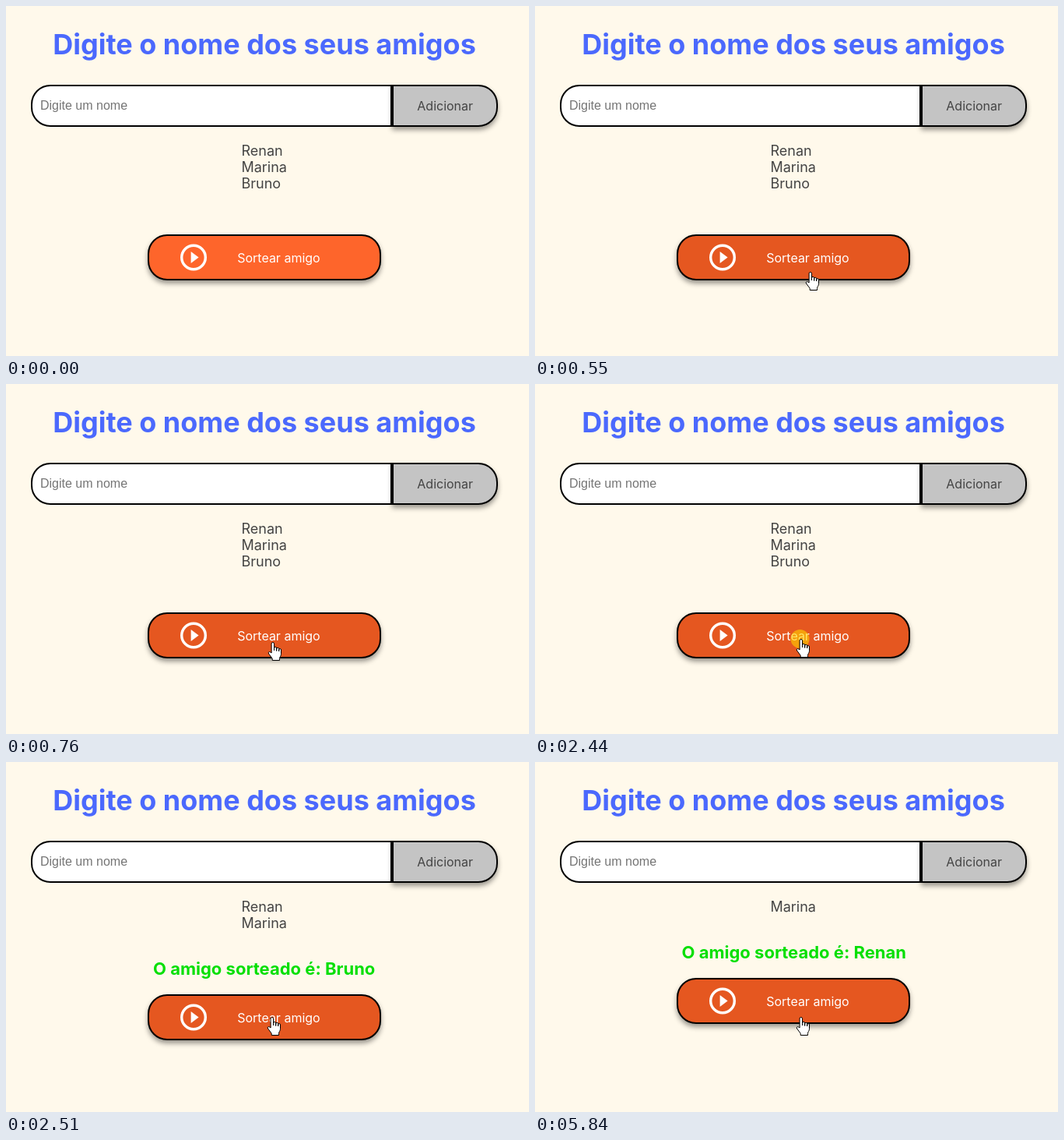
An HTML page for the animation above (8 s loop, 672 by 449 pixels).

```html
<!DOCTYPE html>
<html lang="pt-BR">
<head>
<meta charset="utf-8">
<title>Sorteio de amigos</title>
<style>
  html, body { margin: 0; width: 100%; height: 100%; overflow: hidden; background: #fff9eb; }
  svg { display: block; width: 672px; height: 449px; }
  text { font-family: Inter, sans-serif; font-size: 16px; fill: #444; }
  .title { font-size: 36px; font-weight: 700; fill: #4b69fd; text-anchor: middle; }
  .placeholder { font-family: "Liberation Sans", Arial, sans-serif; fill: #757575; }
  .friend { font-size: 18px; }
  .result { font-size: 22px; font-weight: 700; fill: #05df05; }
  .box { stroke: #000; stroke-width: 2; }
  .shadow { filter: drop-shadow(0 4px 3px rgba(0, 0, 0, .4)); }
  .cursor { fill: #fff; stroke: #000; stroke-linejoin: round; }
</style>
</head>
<body>
<svg viewBox="0 0 672 449">
  <text class="title" x="332" y="62">Digite o nome dos seus amigos</text>

  <path class="box" fill="#fff" d="M495 102H57a24 24 0 0 0-24 24v4a24 24 0 0 0 24 24H495z"/>
  <text class="placeholder" x="44" y="133">Digite um nome</text>
  <path class="box shadow" fill="#c4c4c4" d="M497 102H607a24 24 0 0 1 24 24v4a24 24 0 0 1-24 24H497z"/>
  <text x="528.3" y="134">Adicionar</text>

  <g id="friends"></g>
  <text class="result" id="result"></text>

  <g id="draw">
    <rect class="box shadow" id="face" x="183" y="1" width="298" height="57" rx="24"/>
    <circle cx="241" cy="29.5" r="15.3" fill="none" stroke="#fff" stroke-width="3.4"/>
    <path fill="#fff" d="M237.6 22v15l10-7.5z"/>
    <text x="297.2" y="36" style="fill:#fff">Sortear amigo</text>
  </g>

  <circle id="click" cx="340.5" cy="327" r="12" fill="rgb(255,210,0)" fill-opacity=".6"/>
  <path class="cursor" id="arrow" d="M0 0V17l4-4 2.6 6 2.4-1-2.6-6h5.6z"/>
  <path class="cursor" id="hand" d="M-1.9 14V2.2a1.7 1.7 0 0 1 3.4 0V11V8a1.6 1.6 0 0 1 3.2 0V11.5V8.8a1.5 1.5 0 0 1 3 0V12V10a1.4 1.4 0 0 1 2.8 0V15.5c0 2.5-2 3.5-2 6V23.5H-.8V21.2L-5.4 15c-1.2-2 .8-3.2 2.2-1.9z"/>
</svg>
<script>
const $ = id => document.getElementById(id);
const DURATION = 8000, STEP = 70;

// Result text x and button top vary with the state of the list.
const states = [
  { from: 0, friends: ['Renan', 'Marina', 'Bruno'], top: 293 },
  { from: 2510, friends: ['Renan', 'Marina'], winner: 'Bruno', x: 189, top: 298 },
  { from: 5840, friends: ['Marina'], winner: 'Renan', x: 188.5, top: 277 }
];

// Pointer positions, one per step from 200 ms on.
const path = [[606, 440], [562, 416], [512, 392], [456, 370], [408, 355],
  [354, 341], [348, 336], [345, 333], [343, 331], [342, 329]];

function pointerAt(t) {
  if (t < 200) return null;
  if (t >= 1180) return [342, 327];
  if (t >= 1110) return [342, 328];
  return path[Math.min(path.length - 1, Math.floor((t - 200) / STEP))];
}

const show = (el, visible) => el.setAttribute('visibility', visible ? 'visible' : 'hidden');
const during = (t, start) => t >= start && t < start + STEP;
let current;

function showState(state) {
  current = state;
  $('friends').innerHTML = state.friends
    .map((name, i) => `<text class="friend" x="302.5" y="${192 + 21 * i}">${name}</text>`).join('');
  $('result').textContent = state.winner ? `O amigo sorteado é: ${state.winner}` : '';
  $('result').setAttribute('x', state.x || 0);
  $('result').setAttribute('y', state.top - 25);
  $('draw').setAttribute('transform', `translate(0 ${state.top})`);
}

function render(now) {
  const t = now % DURATION;
  const state = states.findLast(s => t >= s.from);
  if (state !== current) showState(state);

  const pointer = pointerAt(t);
  const hover = t >= 550;
  $('face').setAttribute('fill', hover ? '#e55720' : '#fe652b');
  show($('click'), during(t, 2440) || during(t, 5770));
  show($('arrow'), pointer && !hover);
  show($('hand'), hover);
  if (pointer) $(hover ? 'hand' : 'arrow').setAttribute('transform', `translate(${pointer})`);
}

function loop() {
  render(performance.now());
  requestAnimationFrame(loop);
}
loop();
</script>
</body>
</html>
```
